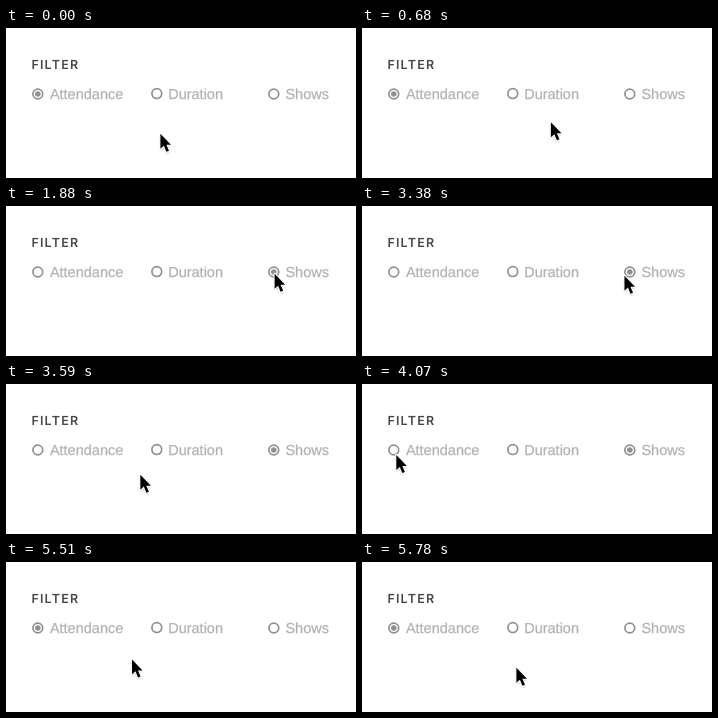
An HTML page for the animation above (7910 ms loop, 350x150 px).

```html
<!DOCTYPE html>
<html lang="en">
<head>
<meta charset="utf-8">
<title>Filter</title>
<style>
html, body { margin: 0; width: 100%; height: 100%; overflow: hidden; background: #fff; }
svg { display: block; width: 350px; height: 150px; text-rendering: geometricPrecision; }
.title { font: 600 12.5px Inter, sans-serif; letter-spacing: 1.2px; fill: #484848; }
.label { font: 14.5px "Liberation Sans", Arial, sans-serif; fill: #b2b2b2; stroke: #b2b2b2; stroke-width: .25; }
.ring { fill: #fff; stroke: #909090; stroke-width: 1.7; }
.dot { fill: #909090; }
.shade { fill: #000; opacity: .35; filter: blur(1px); }
.arrow { fill: #000; stroke: #fff; stroke-width: 2; stroke-linejoin: round; paint-order: stroke; }
</style>
</head>
<body>
<svg viewBox="0 0 350 150">
  <text class="title" x="25.4" y="41">FILTER</text>
  <g>
    <circle class="ring" cx="31.8" cy="66" r="4.9"/>
    <circle class="dot" id="attendance" cx="31.8" cy="66" r="2.8"/>
    <text class="label" x="43.9" y="71">Attendance</text>
  </g>
  <g>
    <circle class="ring" cx="150.8" cy="65.6" r="4.9"/>
    <text class="label" x="162.2" y="70.7">Duration</text>
  </g>
  <g>
    <circle class="ring" cx="267.8" cy="66" r="4.9"/>
    <circle class="dot" id="shows" cx="267.8" cy="66" r="2.8"/>
    <text class="label" x="279.4" y="71">Shows</text>
  </g>
  <g id="cursor">
    <path class="shade" d="M0 1.5V16.5L3.5 13.4 6 19.5 8.6 18.5 6 12.5H10.6Z"/>
    <path class="arrow" d="M0 0V15L3.5 11.9 6 18 8.6 17 6 11H10.6Z"/>
  </g>
</svg>
<script>
const LOOP = 7910, STEP = 30, OFFSET = 20;
const byId = id => document.getElementById(id);
const cursor = byId('cursor'), attendance = byId('attendance'), shows = byId('shows');

const clamp = v => Math.min(1, Math.max(0, v));
const progress = (t, from, to) => clamp((t - from) / (to - from));
const mix = (a, b, p) => a + (b - a) * p;

// Cubic Bezier timing, solved by bisection
function bezier(x1, y1, x2, y2) {
  const at = (s, a, b) => 3 * (1 - s) ** 2 * s * a + 3 * (1 - s) * s * s * b + s ** 3;
  return p => {
    if (p <= 0 || p >= 1) return clamp(p);
    let lo = 0, hi = 1;
    for (let i = 0; i < 24; i++) {
      const mid = (lo + hi) / 2;
      if (at(mid, x1, x2) < p) lo = mid; else hi = mid;
    }
    return at(lo, y1, y2);
  };
}

const linear = p => p;
const home = [154.4, 105.8];
// Each move: start, end, target, easing, downward bow
const moves = [
  [470, 1220, [267.8, 70.5], bezier(.35, 0, .3, 1), -1],
  [1640, 1700, [268.6, 67.8], linear, 0],
  [3350, 4160, [32.8, 70.6], bezier(.2, .08, .2, 1), 21.8],
  [4340, 4400, [33.2, 70], linear, 0],
  [5210, 5780, home, bezier(.35, 0, .3, 1), 0]
];

function cursorAt(t) {
  let [x, y] = home;
  for (const [from, to, target, ease, bow] of moves) {
    if (t <= from) break;
    const p = ease(progress(t, from, to));
    x = mix(x, target[0], p);
    y = mix(y, target[1], p) + bow * Math.sin(Math.PI * p);
  }
  return [x, y];
}

function draw(now) {
  const time = now % LOOP;
  // The picture advances in 30 ms steps
  const t = Math.floor((time - OFFSET) / STEP) * STEP + OFFSET;
  const [x, y] = cursorAt(t);
  const on = progress(t, 1820, 1880) - progress(t, 4520, 4580);
  cursor.setAttribute('transform', `translate(${x.toFixed(2)} ${y.toFixed(2)})`);
  shows.setAttribute('opacity', on);
  attendance.setAttribute('opacity', 1 - on);
}

const start = performance.now();
function tick() {
  draw(performance.now() - start);
  requestAnimationFrame(tick);
}
tick();
</script>
</body>
</html>
```
